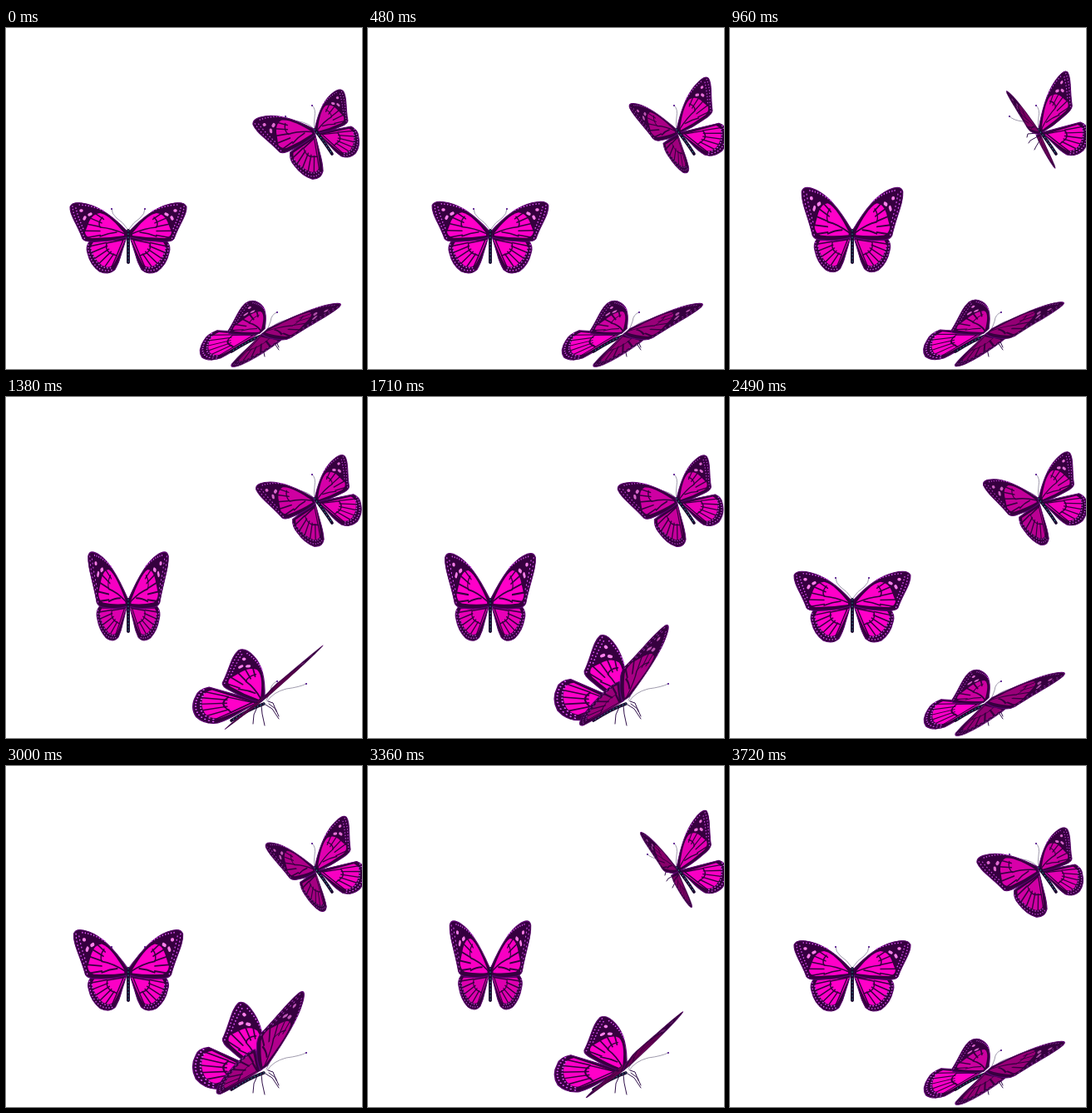
Recreate the animation shown at these times as an HTML page with a canvas. Size 428x409 px, loop 3.75 s.

```html
<!DOCTYPE html>
<html lang="en">
<head>
<meta charset="utf-8">
<title>Butterflies</title>
<style>
html, body { margin: 0; height: 100%; overflow: hidden; background: #fff; }
canvas { display: block; }
</style>
</head>
<body>
<canvas id="stage" width="428" height="409"></canvas>
<script>
const ctx = document.getElementById('stage').getContext('2d');
const LOOP = 3750, STEP = 30, ARC = Math.PI / 4, DARK = '#36003f';

// Veins spread from a hub between two angles (degrees).
function fan(x, y, near, far, from, to, count) {
  const path = new Path2D();
  for (let i = 0; i < count; i++) {
    const a = (from + (to - from) * i / (count - 1)) * Math.PI / 180;
    path.moveTo(x + near * Math.cos(a), y + near * Math.sin(a));
    path.lineTo(x + far * Math.cos(a), y + far * Math.sin(a));
  }
  return path;
}

// Flat right-hand wing parts, measured from the wing root.
const FORE = {
  edge: new Path2D('M1-6C14-20 32-35 50-39Q67-43 70-36C71-26 61-14 55 3Q52 7 40 6Q20 6 2 1Z'),
  pink: new Path2D('M5-4C14-15 24-26 34-28Q43-27 47-18L52-5Q51 1 44 2Q24 2 5-1Z'),
  veins: fan(8, -6, 26, 47, -34, 10, 5),
  cell: new Path2D('M4-3Q20-10 34-11Q37-17 31-23M14-5Q24-4 34 0'),
  dots: new Path2D('M67-36Q66-24 59-12Q54-2 52 4M63-34Q60-22 54-9M30-31Q46-38 62-38'),
  spots: new Path2D('M45-27l2 1M52-23l1 2M56-31h1')
};
const HIND = {
  edge: new Path2D('M2 0L46 5Q52 12 49 20Q46 34 35 42Q24 47 16 40Q11 32 8 20Z'),
  pink: new Path2D('M4 4L42 7Q46 12 44 17Q40 29 31 35Q24 39 18 34Q13 26 4 4Z'),
  veins: fan(5, 3, 22, 44, 12, 66, 6),
  cell: new Path2D('M6 4L26 8Q28 16 22 20L14 23Z'),
  dots: new Path2D('M48 10Q49 22 41 33Q32 44 19 40M45 14Q44 23 36 33Q28 40 19 37'),
  spots: new Path2D()
};

// A wing is spanned by its body axis and a span vector that turns from lowered to raised.
const frontWing = { axis: [0, 1], light: 1, fore: [[1, 0], [.69, -.14]], hind: [[1, 0], [.76, -.08]] };
const butterflies = [
  {
    at: [147, 250],
    flaps: [[350, 1400, 2560], [2660, 3420, 3720]],
    reach: .37,
    body: 'M0-7V31',
    feelers: 'M-1-9Q-6-17-14-22Q-20-27-20-33M1-9Q6-17 14-22Q20-27 20-33',
    knobs: 'M-20-33h0M20-33h0',
    legs: '',
    back: frontWing, front: frontWing, mirror: -1
  },
  {
    at: [373, 126],
    flaps: [[0, 900, 1540], [1540, 2250, 2622], [2750, 3250, 3720]],
    reach: 0,
    body: 'M-2-4Q8 8 19 25',
    feelers: 'M-3-5Q-9-12-21-14Q-32-15-37-20M-2-5Q-3-12-2-19Q0-29-5-33',
    knobs: 'M-37-20h0M-5-33h0',
    legs: 'M-4 0l-11 1l-1 4M-3 4l-9 5l-2 3M0 8l-5 8l-2 4',
    back: { axis: [.4, .8], light: 1, fore: [[.67, -.31], [.67, -.64]], hind: [[.87, -.26], [1, -.37]] },
    front: { axis: [.5, .98], light: .85, fore: [[-.83, .36], [-.3, -.18]], hind: [[-.74, .4], [-.15, -.05]] },
    mirror: 1
  },
  {
    at: [307, 366],
    flaps: [[850, 1900, 2480], [2500, 3050, 3720]],
    reach: 0,
    body: 'M3 2Q-14 8-36 22',
    feelers: 'M6-2Q9-8 11-14Q12-23 19-25M7-1Q14-12 30-16Q46-18 54-22',
    knobs: 'M19-25h0M54-22h0',
    legs: 'M5 3l8 5l8 12M9 2l8 6l4 9M0 4l1 10l3 14M-5 6l-4 9l-1 11M8-1l6 2l4 10',
    back: { axis: [-.8, .82], light: 1, fore: [[-.69, -.09], [-.8, -.76]], hind: [[-1.08, -.16], [-1.28, -.72]] },
    front: { axis: [-1.2, .95], light: .7, fore: [[.72, .045], [.03, -.88]], hind: [[.77, -.06], [-.05, -.68]] },
    mirror: 1
  }
];

// How far the wings are raised: each flap eases from its start to its top and back.
function lift(flaps, t) {
  const flap = flaps.find(([start, , end]) => t >= start && t < end);
  if (!flap) return 0;
  const [start, top, end] = flap;
  const s = t < top ? (t - start) / (top - start) : (end - t) / (end - top);
  return (1 - Math.cos(Math.PI * s)) / 2;
}

// Swing a span vector along an elliptic arc.
const swing = ([low, high], p) => low.map((v, i) =>
  (v * Math.sin(ARC * (1 - p)) + high[i] * Math.sin(ARC * p)) / Math.sin(ARC));

function line(path, color, width, dash = []) {
  ctx.strokeStyle = color;
  ctx.lineWidth = width;
  ctx.setLineDash(dash);
  ctx.stroke(path);
}

function fill(path, color) {
  ctx.fillStyle = color;
  ctx.fill(path);
}

function drawPart(shape, span, axis, light) {
  const area = Math.abs(span[0] * axis[1] - span[1] * axis[0]);
  const shade = light * Math.min(1, .45 + .55 * area);
  ctx.save();
  ctx.transform(...span, ...axis, 0, 0);
  fill(shape.edge, DARK);
  line(shape.edge, '#5c0070', 1);
  fill(shape.pink, `rgb(${255 * shade}, 0, ${200 * shade})`);
  line(shape.veins, DARK, 1.5);
  line(shape.cell, DARK, 1.5);
  ctx.globalAlpha = shade;
  line(shape.dots, '#d850f0', 1.6, [.1, 3.6]);
  line(shape.spots, '#ff80ec', 3.4);
  ctx.restore();
}

function drawWing({ axis, light, fore, hind }, p, reach) {
  const stretch = 1 + reach * Math.sin(p * Math.PI / 2);
  drawPart(HIND, swing(hind, p), axis, light);
  drawPart(FORE, swing(fore, p), axis.map(v => v * stretch), light);
}

function drawButterfly(b, t) {
  const p = lift(b.flaps, t), path = d => new Path2D(d);
  const drawBody = () => {
    line(path(b.body), '#1c0930', 3.6);
    line(path(b.body), '#2aa5a0', 1.2, [.1, 4]);
  };
  ctx.save();
  ctx.translate(...b.at);
  line(path(b.feelers), '#77708a', .7);
  line(path(b.knobs), '#50108a', 2.2);
  drawWing(b.back, p, b.reach);
  line(path(b.legs), '#30104a', 1);
  drawBody();
  ctx.scale(b.mirror, 1);
  drawWing(b.front, p, b.reach);
  if (b.mirror < 0) drawBody();
  ctx.restore();
}

function draw(now) {
  const t = Math.floor(now % LOOP / STEP) * STEP;
  ctx.clearRect(0, 0, 428, 409);
  ctx.lineCap = ctx.lineJoin = 'round';
  butterflies.forEach(b => drawButterfly(b, t));
  requestAnimationFrame(draw);
}
requestAnimationFrame(draw);
</script>
</body>
</html>
```
